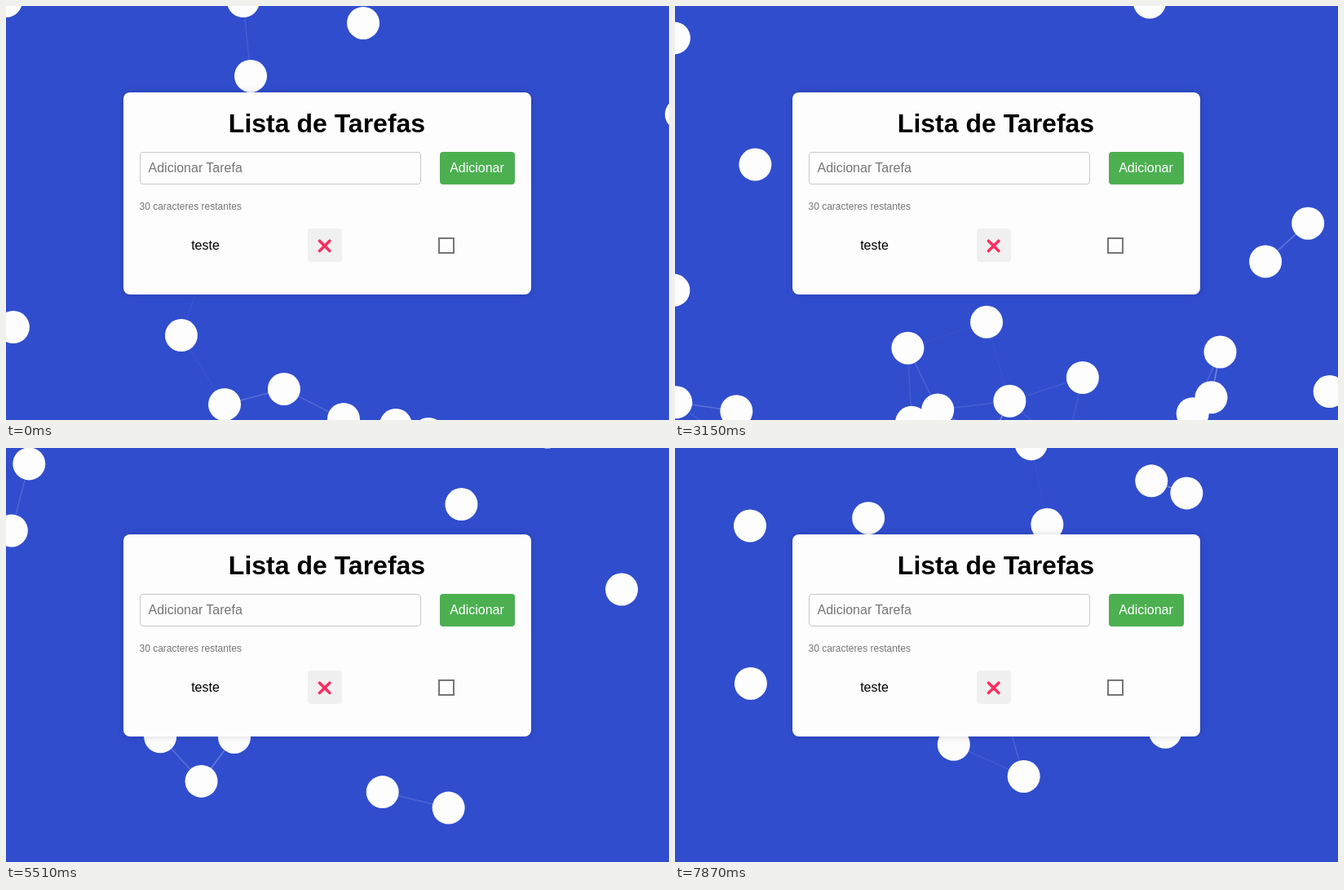
Write an HTML page that moves like this. It is 813x508 px and loops after 7990 ms.

```html
<!DOCTYPE html>
<html lang="pt">
<head>
<meta charset="utf-8">
<title>Lista de Tarefas</title>
<style>
  html, body { margin: 0; width: 100%; height: 100%; overflow: hidden; background: #304dcd; }
  svg { display: block; width: 813px; height: 508px; }
  text { font-family: "Liberation Sans", Arial, sans-serif; font-size: 16px; }
  .card { filter: drop-shadow(0 0 4px rgba(0, 0, 0, .15)); }
</style>
</head>
<body>
<svg viewBox="0 0 813 508">
  <rect width="813" height="508" fill="#304dcd"/>
  <g id="links" stroke="#fff" stroke-width="1.5"></g>
  <g id="dots" fill="#fdfdfd"></g>
  <rect class="card" x="144" y="106" width="500" height="248" rx="8" fill="#fdfdfd"/>
  <text x="393.5" y="155" text-anchor="middle" style="font-size:32px;font-weight:bold">Lista de Tarefas</text>
  <rect x="164.5" y="179.5" width="344" height="39" rx="3.5" fill="#fdfdfd" stroke="#c8c8c8"/>
  <text x="174.5" y="204" fill="#757575">Adicionar Tarefa</text>
  <rect x="532" y="179" width="92" height="40" rx="4" fill="#4caf50"/>
  <text x="577.5" y="204" text-anchor="middle" fill="#fff">Adicionar</text>
  <text x="163.5" y="250" fill="#757575" style="font-size:12px">30 caracteres restantes</text>
  <text x="244.5" y="299" text-anchor="middle">teste</text>
  <rect x="370" y="273" width="42" height="41" rx="4" fill="#f0f0f0"/>
  <path d="M384.5 288.2l12.4 12.4m0-12.4l-12.4 12.4" stroke="#f92f60" stroke-width="3.6" stroke-linecap="round"/>
  <rect x="531" y="285" width="18" height="18" fill="#fdfdfd" stroke="#767676" stroke-width="2"/>
</svg>
<script>
const LOOP = 7990, RADIUS = 20, REACH = 105, LINK_ALPHA = 0.7;

const linkLayer = document.getElementById("links");
const dotLayer = document.getElementById("dots");
const dots = [];

function add(layer, tag, attrs) {
  const node = document.createElementNS("http://www.w3.org/2000/svg", tag);
  for (const key in attrs) node.setAttribute(key, attrs[key]);
  layer.appendChild(node);
  return node;
}

// A stream is a heading in px/s and the points its dots start from, on or off the stage.
function stream(vx, vy, ...starts) {
  for (const [x, y] of starts) dots.push({ x, y, vx, vy, node: add(dotLayer, "circle", { r: RADIUS }) });
}

// rising to the left
stream(-77, -87.4, [341, 470]);
stream(-95, -59, [1102, 659]);
stream(-36.7, -84.5, [526, 751]);
stream(-45, -75.5, [528, 771], [696, 958]);
stream(-40.8, -27.7, [414, 507]);
stream(-48.7, -16.4, [811, 532]);
// rising to the right
stream(3.6, -104.8, [828, 133], [-13, 679]);
stream(11.6, -83.2, [300, 86], [345.5, 650]);
stream(21.3, -79.4, [223, 761]);
stream(52.7, -76.2, [268, 489]);
stream(65.4, -67.1, [518, 525]);
stream(69.6, -37.4, [-144, 615]);
stream(59.1, -31.1, [438, 21], [136, 593.5]);
stream(70.5, -2, [554, 273]);
// sinking to the right
stream(73.3, 75.4, [248, 309], [351, -242]);
stream(35, 22, [-109, 417]);
stream(9, 43, [471.5, 320.5]);
// sinking to the left
stream(-18.5, 59, [773, -409]);
stream(-44, 44, [215, 404]);
stream(-76, 76, [0, -6], [908, 185]);
stream(-85, 97, [761, -668]);
stream(-64, 36, [478, 514], [381, -179], [1088, -243]);
stream(-88, 48, [9, 394], [912, 349], [1149, -284]);
stream(-92.7, 14.4, [291, -6]);

function render(t) {
  const points = dots.map(d => [d.x + d.vx * t, d.y + d.vy * t]);
  linkLayer.replaceChildren();
  points.forEach(([x1, y1], i) => {
    dots[i].node.setAttribute("cx", x1);
    dots[i].node.setAttribute("cy", y1);
    for (const [x2, y2] of points.slice(i + 1)) {
      const closeness = 1 - Math.hypot(x2 - x1, y2 - y1) / REACH;
      if (closeness > 0) add(linkLayer, "line", { x1, y1, x2, y2, opacity: LINK_ALPHA * closeness });
    }
  });
}

const origin = performance.now();
function tick() {
  render((performance.now() - origin) % LOOP / 1000);
  requestAnimationFrame(tick);
}
tick();
</script>
</body>
</html>
```
